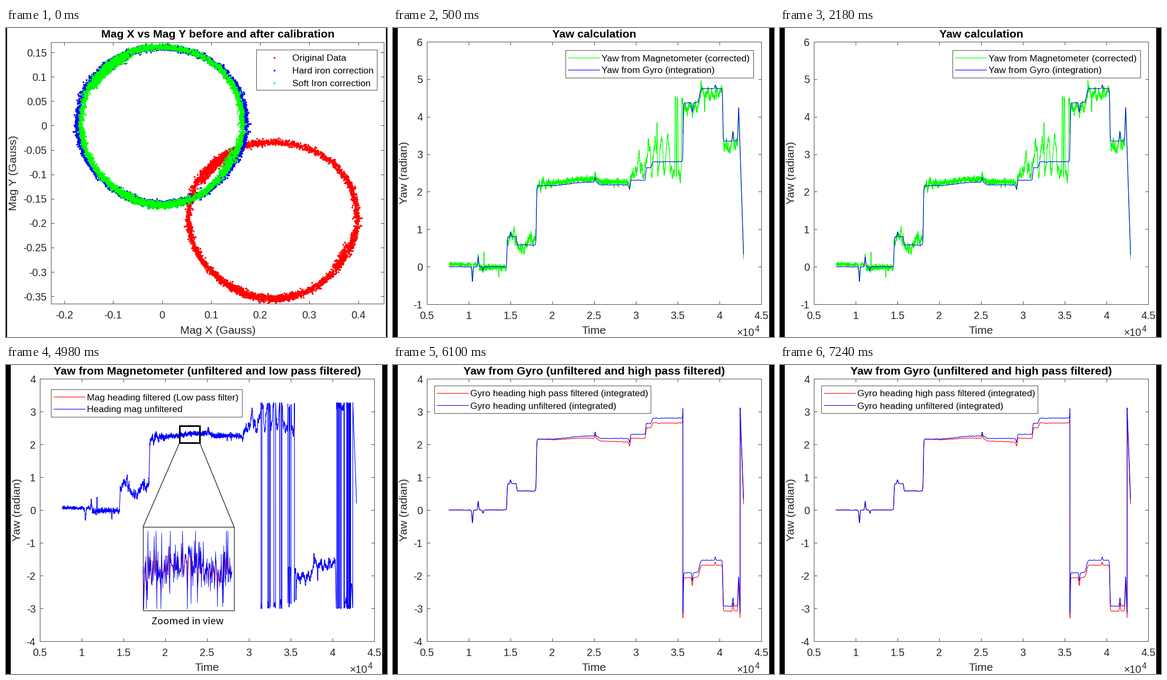
A matplotlib script that plays this animation: 720 px wide and 584 px high, repeating every 8000 ms.

```python
import numpy as np
import matplotlib.pyplot as plt
from matplotlib.animation import FuncAnimation
from matplotlib.patches import Rectangle

W, H = 720, 584
PT = 0.72  # points per pixel at 100 dpi
INK, FRAME = "#262626", "#484848"
RED, GREEN, BLUE = "#ff0000", "#00ff00", "#0000ff"
LABEL, TICK, LEGEND = 21.3, 19.7, 17.5

plt.rcParams["font.family"] = "Liberation Sans"
rng = np.random.default_rng(7)
fig = plt.figure(figsize=(7.2, 5.84), dpi=100, facecolor="white")


# ---------- data ----------

def arc(n, start, end, inner, outer):
    """Random points along part of the slightly dented ring, in Gauss."""
    a = np.radians(rng.uniform(start, end, n))
    r = (.166 - .0015 * np.cos(a) + .002 * np.sin(a)
         + .0055 * np.cos(2 * a) + .0025 * np.sin(3 * a))
    r *= rng.uniform(inner, outer, n)
    return np.column_stack([r * np.cos(a), r * np.sin(a)])


def ring_cloud():
    xy = np.vstack([arc(3300, 0, 360, .99, 1.01),
                    arc(420, 118, 152, .93, 1),
                    arc(110, 322, 342, .93, .98),
                    arc(400, 220, 290, .96, 1.02)])
    return xy + rng.normal(0, .003, xy.shape)


def step(t, at, size, width=.005):
    return size * (1 + np.tanh((t - at) / width)) / 2


def bump(t, at, size, width=.008):
    return size * np.exp(-((t - at) / width) ** 2)


def box(t, start, end, size):
    return step(t, start, size, .002) - step(t, end, size, .002)


def total(shape, t, rows):
    return sum(shape(t, *row) for row in rows)


def noise(t, nodes):
    return np.interp(t, np.linspace(t[0], t[-1], nodes),
                     rng.normal(size=nodes))


def wrap(v, low):
    return (v - low) % (2 * np.pi) + low


def gyro_yaw(t):
    turns = [(1.458, .8), (1.575, -.22), (1.81, 1.58), (2.2, .1, .15),
             (2.55, -.08, .02), (2.935, .13), (3.118, .33), (3.19, .16, .01),
             (3.565, 1.57), (3.76, .38, .015), (4.04, -1.4), (4.222, .93)]
    jerks = [(1.045, -.39), (1.114, .26), (1.171, -.1), (1.5, .12),
             (2.513, .12), (2.924, -.12), (3.674, -.24), (3.949, .1),
             (4.161, .25)]
    fall = 68 * np.maximum(t - 4.23, 0)
    return (total(step, t, turns) + total(bump, t, jerks) - fall
            + .006 * noise(t, 350))


def magnetic_yaw(t, gyro):
    shift = .07 + total(step, t, [
        (1.1, -.09), (1.58, -.08, .02), (1.7, .27, .01), (1.81, -.13),
        (2, .04), (2.97, .2, .02), (3.13, -.28), (3.58, -.12)])
    spikes = total(bump, t, [
        (1.183, .4, .003), (1.361, -.25, .003), (1.544, .2, .003),
        (3.038, .42, .012), (3.253, .8, .003), (3.778, .4, .003),
        (3.823, -.5, .004)])
    swing = (box(t, 3.125, 3.43, 1)
             * (.25 + .5 * np.cos(2 * np.pi * (t - 3.155) / .075))
             - box(t, 3.43, 3.56, .3))
    flips = sum(box(t, a, b, 1.95)
                for a, b in [(3.466, 3.48), (3.49, 3.504), (3.545, 3.562)])
    level = .028 + total(step, t, [(1.1, .022), (1.46, .05), (2, -.057),
                                   (2.95, .062), (4.235, -.1)])
    fine = np.clip(level, 0, .045) * noise(t, 3500)
    coarse = 1.7 * np.maximum(level - .045, 0) * noise(t, 550)
    return gyro + shift + spikes + swing + flips + fine + coarse


time = np.linspace(.766, 4.288, 8000)
gyro = gyro_yaw(time)
mag = magnetic_yaw(time, gyro)


# ---------- drawing ----------

def make_scene(area, xlim, ylim, xticks, yticks, bar):
    """Return a plot and a pixel-unit overlay above it."""
    left, top, right, bottom = area
    plot = fig.add_axes([left / W, 1 - bottom / H,
                         (right - left) / W, (bottom - top) / H])
    plot.set(xlim=xlim, ylim=ylim)
    plot.set_xticks(xticks, [f"{v:g}" for v in xticks])
    plot.set_yticks(yticks, [f"{v:g}" for v in yticks])
    plot.tick_params(direction="in", top=True, right=True, length=6 * PT,
                     width=PT, color=FRAME, labelcolor=INK,
                     labelsize=TICK * PT)
    plot.tick_params(axis="x", pad=13 * PT)
    plot.tick_params(axis="y", pad=8 * PT)
    for spine in plot.spines.values():
        spine.set(linewidth=PT, color=FRAME)

    over = fig.add_axes([0, 0, 1, 1], zorder=2)
    over.set(xlim=(0, W), ylim=(H, 0))
    over.axis("off")
    for x in (0, W - bar):
        over.add_patch(Rectangle((x, 0), bar, H, fc="black", lw=0))
    return plot, over


def ticks(first, last, gap):
    count = round((last - first) / gap) + 1
    return np.round(np.linspace(first, last, count), 2) + 0.0


def write(over, x, y, text, size, ha="center", color=INK, **kw):
    over.text(x, y, text, fontsize=size * PT, ha=ha, va="baseline",
              color=color, **kw)


def name_axes(over, title, xlabel, ylabel, cx, ly):
    write(over, cx, 18, title, LABEL, weight="bold", color="black")
    write(over, cx, 577.5, xlabel, LABEL)
    write(over, ly, 273.5, ylabel, LABEL, rotation=90, rotation_mode="anchor")


def frame(over, x0, y0, x1, y1, width=1, color=FRAME, fill="white"):
    over.add_patch(Rectangle((x0, y0), x1 - x0, y1 - y0, fc=fill, ec=color,
                             lw=width * PT, joinstyle="miter"))


def line(ax, x, y, color, width=1.15):
    ax.plot(x, y, color=color, lw=width * PT)


def line_legend(over, area, entries):
    frame(over, *area)
    x, y = area[0], area[1] + 14
    for color, text in entries:
        line(over, [x + 5, x + 64], [y, y], color)
        write(over, x + 68, y + 6.5, text, LEGEND, "left", "black")
        y += 23


def yaw_scene(title, low, high):
    plot, over = make_scene((64, 26, 696, 522), (.5, 4.5), (low, high),
                            ticks(.5, 4.5, .5), ticks(low, high, 1), 9)
    name_axes(over, title, "Time", "Yaw (radian)", 380, 27)
    write(over, 650, 582, "×10", TICK, "left")
    write(over, 684, 574, "4", 16, "left")
    return plot, over


def calibration():
    plot, over = make_scene((85, 27, 714, 521), (-.2267, .4522),
                            (-.365, .1708), ticks(-.2, .4, .1),
                            ticks(-.35, .15, .05), 2)
    name_axes(over, "Mag X vs Mag Y before and after calibration",
              "Mag X (Gauss)", "Mag Y (Gauss)", 400, 20)
    cloud = ring_cloud()
    layers = [(RED, cloud + (.2267, -.1936), "Original Data"),
              (BLUE, cloud, "Hard iron correction"),
              (GREEN, cloud * (.955, 1.01), "Soft Iron correction")]
    frame(over, 473, 41, 701, 117)
    for i, (color, xy, text) in enumerate(layers):
        dots = dict(marker="o", ls="", ms=3.5 * PT, mew=0, color=color)
        plot.plot(xy[:, 0], xy[:, 1], **dots)
        over.plot([507], [56 + 24 * i], **dots)
        write(over, 541, 62 + 24 * i, text, LEGEND, "left", "black")
    return plot, over


def comparison():
    plot, over = yaw_scene("Yaw calculation", -1, 6)
    line(plot, time, mag, GREEN)
    line(plot, time, gyro, BLUE)
    line_legend(over, (326, 42, 681, 94),
                [(GREEN, "Yaw from Magnetometer (corrected)"),
                 (BLUE, "Yaw from Gyro (integration)")])
    return plot, over


def zoom_inset(over):
    frame(over, 328, 115, 366, 147, 3, "black", "none")
    line(over, [328, 259], [147, 306], "black")
    line(over, [366, 431], [147, 306], "black")
    frame(over, 259, 306, 431, 464, 1.4, "#333333")
    s = np.linspace(0, 1, 240)
    raw = 397 - 26 * np.sin(np.pi * s) ** 2 + rng.laplace(0, 21, s.size)
    raw = np.clip(raw, 314, 461)
    smooth = np.convolve(np.pad(raw, 1, mode="edge"), [.25, .5, .25], "valid")
    x = 259 + 168 * s
    line(over, x, smooth, RED)
    line(over, x, raw, BLUE, .9)
    write(over, 343.5, 489.5, "Zoomed in view", 18.4, color="black",
          family="Noto Sans CJK JP")


def low_pass():
    plot, over = yaw_scene(
        "Yaw from Magnetometer (unfiltered and low pass filtered)", -4, 4)
    line(plot, time, wrap(mag, -3.01), BLUE)
    line_legend(over, (85, 46, 446, 98),
                [(RED, "Mag heading filtered (Low pass filter)"),
                 (BLUE, "Heading mag unfiltered")])
    zoom_inset(over)
    return plot, over


def high_pass():
    plot, over = yaw_scene(
        "Yaw from Gyro (unfiltered and high pass filtered)", -4, 4)
    heading = wrap(gyro, -np.pi)
    drift = np.clip(.1 * (time - 1.8), 0, .15)
    line(plot, time, heading - drift, RED)
    line(plot, time, heading, BLUE)
    line_legend(over, (78, 39, 487, 91),
                [(RED, "Gyro heading high pass filtered (integrated)"),
                 (BLUE, "Gyro heading unfiltered (integrated)")])
    return plot, over


scenes = [calibration(), comparison(), low_pass(), high_pass()]
STARTS = [0, 500, 3300, 6100]
STEP = 100


def update(n):
    current = np.searchsorted(STARTS, n * STEP, side="right") - 1
    for i, scene in enumerate(scenes):
        for ax in scene:
            ax.set_visible(i == current)
    return []


anim = FuncAnimation(fig, update, frames=80, interval=STEP, repeat=True,
                     repeat_delay=0, blit=False)
plt.show()
```
